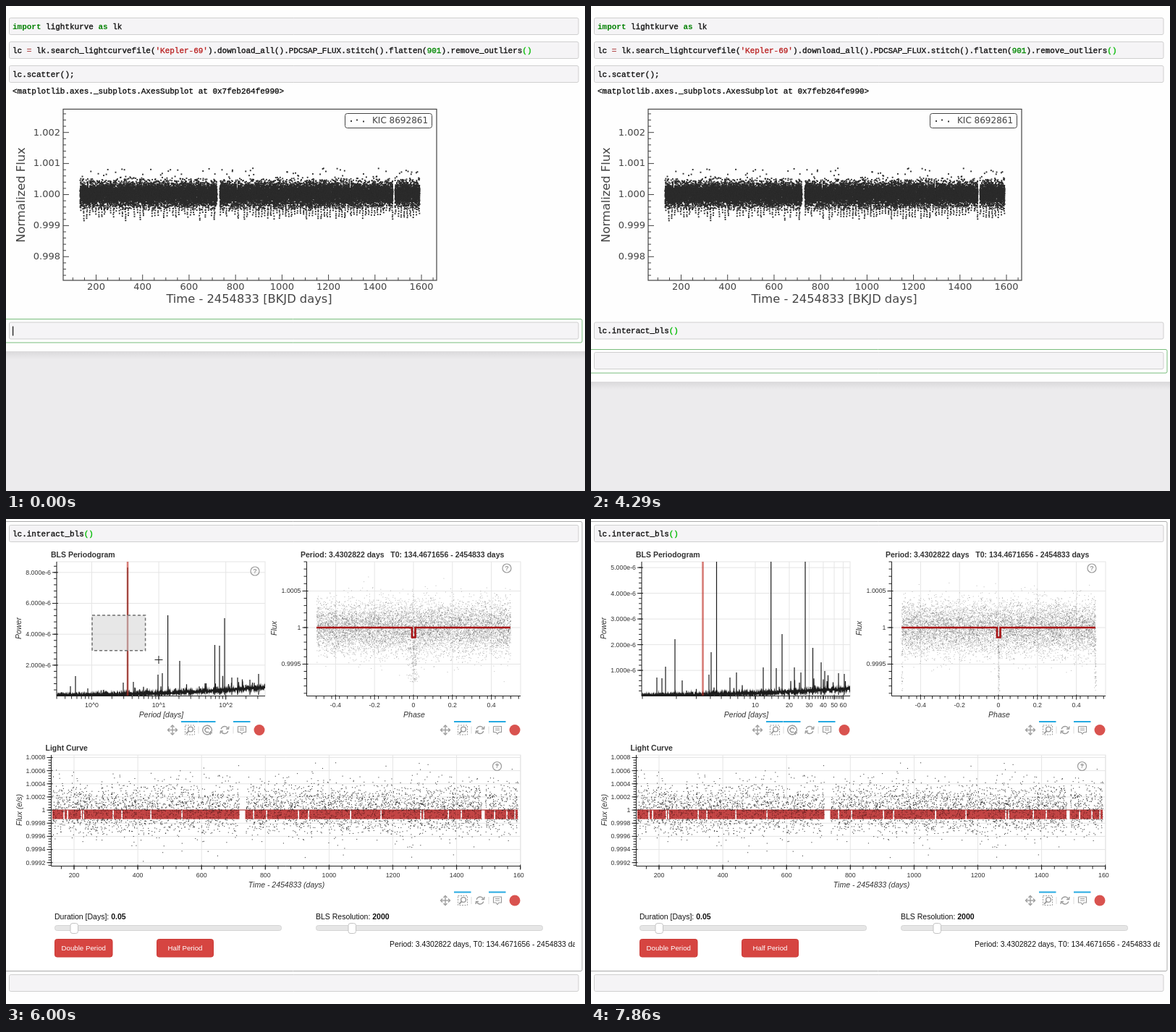
Recreate the animation shown at these times as an HTML page with a canvas. Size 800 px wide and 670 px high, loop 8 s.

```html
<!DOCTYPE html>
<html lang="en">
<head>
<meta charset="utf-8">
<title>Interactive BLS periodogram</title>
<style>
html, body { margin: 0; width: 100%; height: 100%; overflow: hidden; background: #fefefe; }
canvas { display: block; }
</style>
</head>
<body>
<canvas id="stage" width="800" height="670"></canvas>
<script>
const W = 800, H = 670, LOOP = 8000, STEP = 1000 / 7;
const MONO = '"Liberation Mono", monospace';
const SANS = '"Liberation Sans", sans-serif';
const DEJA = '"DejaVu Sans", sans-serif';
const CODE = 'lc.interact_bls()';
const PLAIN = '#111', KEYWORD = '#008000', BRACKET = '#0b0';
const view = document.getElementById('stage').getContext('2d');
let g = view;

// ---------- helpers ----------
function random(seed) {
  return () => {
    seed = (seed + 0x6D2B79F5) | 0;
    let r = Math.imul(seed ^ (seed >>> 15), seed | 1);
    r ^= r + Math.imul(r ^ (r >>> 7), r | 61);
    return ((r ^ (r >>> 14)) >>> 0) / 4294967296;
  };
}
const gauss = rnd => Math.sqrt(-2 * Math.log(1 - rnd())) * Math.cos(6.2832 * rnd());

function layer(paint) {
  const canvas = document.createElement('canvas');
  canvas.width = W;
  canvas.height = H;
  g = canvas.getContext('2d');
  paint();
  g = view;
  return canvas;
}
function rect(x, y, w, h, color) {
  g.fillStyle = color;
  g.fillRect(x, y, w, h);
}
function line(color, width, ...xy) {
  g.strokeStyle = color;
  g.lineWidth = width;
  g.beginPath();
  for (let i = 0; i < xy.length; i += 2) g.lineTo(xy[i], xy[i + 1]);
  g.stroke();
}
function box(x, y, w, h, fill, stroke, radius = 2) {
  g.beginPath();
  g.roundRect(x, y, w, h, radius);
  if (fill) { g.fillStyle = fill; g.fill(); }
  if (stroke) { g.strokeStyle = stroke; g.lineWidth = 1; g.stroke(); }
}
function text(s, x, y, font, color = '#333', align = 'left', turn = 0, outline = 0) {
  g.save();
  g.translate(x, y);
  g.rotate(turn);
  g.font = font;
  g.fillStyle = g.strokeStyle = color;
  g.textAlign = align;
  g.textBaseline = 'middle';
  g.fillText(s, 0, 0);
  if (outline) {
    g.lineWidth = outline;
    g.strokeText(s, 0, 0);
  }
  const width = g.measureText(s).width;
  g.restore();
  return width;
}
// parts: alternating text and colour; plain code is drawn in a medium weight
function code(y, ...parts) {
  let x = 9;
  for (let i = 0; i < parts.length; i += 2) {
    const bold = parts[i + 1] === KEYWORD;
    x += text(parts[i], x, y, `${bold ? 'bold ' : ''}10.97px ${MONO}`, parts[i + 1], 'left', 0, bold ? 0 : .35);
  }
}
const cell = y => box(4.5, y + .5, 786.5, 23, '#f5f4f6', '#cfcfcf');

// ---------- notebook ----------
function scatterPlot() {
  const INK = '#444', rnd = random(7);
  const dot = (x, y, s = 1.9) => g.fillRect(x - s / 2, y - s / 2, s, s);
  const inGap = x => (x > 291.5 && x < 295.5) || (x > 534.5 && x < 537.5);
  g.fillStyle = '#2b2b2b';
  for (let i = 0; i < 22000; i++) {
    const x = 102.5 + 469 * rnd(), d = gauss(rnd) * 7.9;
    if (!inGap(x) && Math.abs(d) < 22) dot(x, 260 + d);
  }
  for (let x = 103; x < 572; x += 4.1)
    for (let y = 276; y < 280 + 17 * Math.sqrt(rnd()); y += 2 + 2 * rnd())
      if (!inGap(x)) dot(x + rnd(), y);
  for (let i = 0; i < 130; i++) {
    const x = 103 + 468 * rnd();
    if (!inGap(x)) dot(x, 242 - 18 * rnd() ** 1.6);
  }
  for (const x of [114, 319, 475]) rect(x, 241, .8, 10, '#fefefe');

  g.strokeStyle = INK;
  g.lineWidth = 1.2;
  g.strokeRect(79, 142.5, 516, 236.5);
  for (let v = 100; v <= 1650; v += 50) {
    const x = 124.5 + (v - 200) * .3211, major = v % 200 === 0;
    line(INK, 1, x, 379, x, major ? 371 : 375);
    if (major) text(v, x, 388.5, `13px ${DEJA}`, INK, 'center');
  }
  for (let i = -13; i <= 13; i++) {
    const y = 260.5 - i * 8.58, major = i % 5 === 0;
    line(INK, 1, 79, y, major ? 87 : 83, y);
    if (major) text((1 + i / 5000).toFixed(3), 75, y + .5, `13px ${DEJA}`, INK, 'right');
  }
  text('Time - 2454833 [BKJD days]', 336, 405.5, `16.3px ${DEJA}`, INK, 'center');
  text('Normalized Flux', 22, 261, `16.3px ${DEJA}`, INK, 'center', -Math.PI / 2);
  box(468.5, 148.5, 120, 20, '#fefefe', INK, 3);
  g.fillStyle = '#2b2b2b';
  dot(477, 159); dot(485, 157.5); dot(494, 159.5);
  text('KIC 8692861', 506, 158.5, `12px ${DEJA}`, INK);
}

const notebook = layer(() => {
  rect(0, 0, W, H, '#fefefe');
  [16, 49, 82].forEach(cell);
  code(29, 'import', KEYWORD, ' lightkurve ', PLAIN, 'as', KEYWORD, ' lk', PLAIN);
  code(62, 'lc ', PLAIN, '=', '#a33', ' lk.search_lightcurvefile(', PLAIN, "'Kepler-69'", '#ba2121',
    ').download_all().PDCSAP_FLUX.stitch().flatten(', PLAIN, '901', '#080',
    ').remove_outliers', PLAIN, '()', BRACKET);
  code(95, 'lc.scatter();', PLAIN);
  code(118, '<matplotlib.axes._subplots.AxesSubplot at 0x7feb264fe990>', PLAIN);
  scatterPlot();
});

function drawNotebook(f) {
  const ran = f >= 23;
  const count = f < 2 ? 0 : f < 4 ? 1 : f < 14 ? f - 2 : f - 3;
  g.drawImage(notebook, 0, 0);
  const top = ran ? 474.5 : 432.5, floor = ran ? 519 : 477;
  box(-4, top, 800, 32.5, '#fff', '#78bd7c');
  cell(436.5);
  if (ran) cell(478);
  rect(0, floor, W, H - floor, '#ecebed');
  const shade = g.createLinearGradient(0, floor, 0, floor + 11);
  shade.addColorStop(0, '#dad9db');
  shade.addColorStop(1, '#ecebed');
  rect(0, floor, W, 11, shade);
  code(449.5, CODE.slice(0, Math.min(count, 15)), PLAIN, count > 15 ? '()' : '', BRACKET);
  if (!ran) rect(9 + 6.58 * (f >= 20 ? 17 : Math.min(count, 16)), 442.5, 1.2, 13, PLAIN);
}

// ---------- dashboard ----------
const TICK = `8.8px ${SANS}`, LABEL = `italic 10.5px ${SANS}`, TITLE = `bold 10.5px ${SANS}`;
const GRID = '#e5e5e5', AXIS = '#222';

// xs, ys: [position, label] pairs; minor ticks are plain positions
function axes(x0, y0, x1, y1, xs, ys, xMinor, yMinor) {
  g.strokeStyle = GRID;
  g.lineWidth = 1;
  g.strokeRect(x0, y0, x1 - x0, y1 - y0);
  for (const [x] of xs) line(GRID, 1, x, y0, x, y1);
  for (const [y] of ys) line(GRID, 1, x0, y, x1, y);
  return () => {
    line(AXIS, 1, x0, y0, x0, y1, x1, y1);
    for (const x of xMinor) if (x >= x0 && x <= x1) line(AXIS, 1, x, y1, x, y1 + 4);
    for (const y of yMinor) if (y >= y0 && y <= y1) line(AXIS, 1, x0 - 4, y, x0, y);
    for (const [x, s] of xs) {
      line(AXIS, 1, x, y1 - 2, x, y1 + 5);
      text(s, x, y1 + 13, TICK, '#333', 'center');
    }
    for (const [y, s] of ys) {
      line(AXIS, 1, x0 - 6, y, x0 + 2, y);
      text(s, x0 - 8, y + .5, TICK, '#333', 'right');
    }
  };
}
const range = (n, fn) => Array.from({ length: n }, (_, i) => fn(i));

function help(x, y) {
  g.beginPath();
  g.arc(x, y, 6, 0, 7);
  g.strokeStyle = '#999';
  g.lineWidth = 1.2;
  g.stroke();
  text('?', x, y + .5, `bold 9px ${SANS}`, '#999', 'center');
}

const ICON = '#9a9a9a';
const icons = {
  pan(x, y) {
    line(ICON, 1.3, x - 6, y, x + 6, y);
    line(ICON, 1.3, x, y - 6, x, y + 6);
    for (let i = 0; i < 4; i++) {
      g.save();
      g.translate(x, y);
      g.rotate(i * Math.PI / 2);
      line(ICON, 1.3, 4, -2.5, 6.5, 0, 4, 2.5);
      g.restore();
    }
  },
  zoom(x, y) {
    g.setLineDash([2, 1.5]);
    line(ICON, 1, x - 6.5, y - 6.5, x + 6.5, y - 6.5, x + 6.5, y + 6.5, x - 6.5, y + 6.5, x - 6.5, y - 6.5);
    g.setLineDash([]);
    icons.ring(x + 1, y - 1, 3.4, 0, 7);
    line(ICON, 1.8, x - 1, y + 1, x - 5, y + 5);
  },
  ring(x, y, r, a, b) {
    g.strokeStyle = ICON;
    g.lineWidth = 1.4;
    g.beginPath();
    g.arc(x, y, r, a, b);
    g.stroke();
  },
  wheel(x, y) {
    icons.ring(x, y, 6.3, .9, 6.8);
    icons.ring(x, y, 3, .9, 6);
    line(ICON, 1.3, x + 2, y + 4, x + 7, y + 4);
    line(ICON, 1.3, x + 4.5, y + 1.5, x + 4.5, y + 6.5);
  },
  reset(x, y) {
    icons.ring(x, y, 5, .3, 2.7);
    icons.ring(x, y, 5, 3.4, 5.8);
    line(ICON, 1.4, x + 6, y - 5, x + 5.5, y - 1.5, x + 2, y - 1.5);
    line(ICON, 1.4, x - 6, y + 5, x - 5.5, y + 1.5, x - 2, y + 1.5);
  },
  hover(x, y) {
    line(ICON, 1.2, x - 5.5, y - 5, x + 5.5, y - 5, x + 5.5, y + 3, x + 2, y + 3,
      x, y + 5.5, x - 2, y + 3, x - 5.5, y + 3, x - 5.5, y - 5);
    line(ICON, 1, x - 3, y - 2.5, x + 3, y - 2.5);
    line(ICON, 1, x - 3, y, x + 3, y);
  }
};
function toolbar(x, y, names) {
  names.forEach((name, i) => {
    const cx = x + 24 * i;
    icons[name](cx, y);
    if (['zoom', 'wheel', 'hover'].includes(name)) rect(cx - 12, y - 12.5, 23.5, 2, '#26aae1');
    if (name === 'zoom' || name === 'reset') line('#ddd', 1, cx + 12, y - 5, cx + 12, y + 5);
  });
  g.fillStyle = '#d9534f';
  g.beginPath();
  g.arc(x + 24 * names.length, y, 7.5, 0, 7);
  g.fill();
}

const PEAKS = [[89, 231], [96, 217], [113, 234], [162, 226], [168, 67], [176, 225], [210, 215],
  [216, 213], [223.6, 133], [240, 196], [288.5, 174], [295, 175], [302, 137], [312, 219],
  [320, 219], [337, 222], [349, 214]];
const FINE_PEAKS = [[91, 219], [98, 220], [103, 204], [116, 166], [126, 223], [163, 215], [166, 184],
  [173.5, 30], [192, 219], [201, 212], [238, 205], [248.7, 30], [256, 206], [264, 159], [281, 205],
  [290, 212], [296, 30], [306.5, 178], [318, 198], [323, 210], [342, 213], [350, 214]];

function spectrum(peaks, seed, rise, mapX, mapY) {
  const rnd = random(seed);
  g.save();
  g.beginPath();
  g.rect(70, 59, 288, 185.5);
  g.clip();
  g.beginPath();
  for (let x = 70; x <= 358; x += .5) {
    const u = (x - 70) / 288, base = 243.5 - rise * u ** 2;
    const spike = (1.2 + 2.5 * u) * rnd() + 20 * (.2 + u) * rnd() ** 22;
    g.lineTo(mapX(x), mapY(base - spike));
    g.lineTo(mapX(x + .25), mapY(base + .3));
  }
  for (const [x, y] of peaks) {
    g.moveTo(mapX(x), mapY(243));
    g.lineTo(mapX(x), mapY(y));
  }
  g.strokeStyle = '#1c1c1c';
  g.lineWidth = 1.2;
  g.stroke();
  g.restore();
}

// state: 0 = full range, 1 = zoomed, 2 = zoomed and recomputed
function periodogram(state) {
  const zoom = state > 0;
  const logX = p => zoom ? 227 + 156 * Math.log10(p / 10) : 118.5 + 92.6 * Math.log10(p);
  const xs = zoom ? range(6, i => [logX(10 * (i + 1)), 10 * (i + 1)])
    : range(3, i => [logX(10 ** i), '10^' + i]);
  const unit = zoom ? 35.5 : 21.35;
  const ys = range(zoom ? 5 : 4, i => {
    const v = zoom ? i + 1 : 2 * i + 2;
    return [244.6 - v * unit, v + '.000e-6'];
  });
  const xMinor = range(36, i => logX((i % 9 + 1) * 10 ** (Math.floor(i / 9) - 1)));
  if (zoom) xMinor.push(...range(26, i => logX(10 + 2 * i)));
  const finish = axes(70, 59, 358, 244.5, xs, ys, xMinor, range(26, i => 244.6 - i * unit * (zoom ? .2 : .4)));
  if (state === 2) spectrum(FINE_PEAKS, 21, 8, x => x, y => y);
  else spectrum(PEAKS, 5, 10, zoom ? x => 71 + (x - 118.5) * 1.685 : x => x,
    zoom ? y => 244.6 + (y - 244.6) * 1.664 : y => y);
  line('rgba(190,45,35,.62)', 2.6, logX(3.4303), 59, logX(3.4303), 244);
  finish();
  text('BLS Periodogram', 62, 50, TITLE);
  text('Period [days]', 214.5, 271, LABEL, '#333', 'center');
  text('Power', 18, 151, LABEL, '#333', 'center', -Math.PI / 2);
  if (!zoom) help(344, 72);
  toolbar(230, 291.5, ['pan', 'zoom', 'wheel', 'reset', 'hover']);
}

function phasePlot(state) {
  const rnd = random(11 + state), folded = state === 2;
  const finish = axes(415.5, 59, 711, 244.5,
    [-.4, -.2, 0, .2, .4].map(v => [563 + v * 269, v]),
    [[99.5, '1.0005'], [150, '1'], [200.5, '0.9995']],
    range(27, i => 428.5 + i * 10.76), range(20, i => 59 + i * 10.1));
  g.fillStyle = 'rgba(60,60,60,.42)';
  for (let i = 0; i < 8500; i++) {
    const y = 150 + gauss(rnd) * 18;
    if (y > 62 && y < 230) g.fillRect(429 + 268 * rnd(), y, .9, .9);
  }
  for (let i = 0; i < 150; i++) {
    const centre = folded ? 429.5 + 133.5 * Math.floor(rnd() * 3) : 563.5;
    g.fillRect(centre + gauss(rnd) * (folded ? .6 : 4), 165 + (folded ? 72 : 60) * rnd(), .9, .9);
  }
  line('#a81416', 2.6, 429, 150, 561, 150, 561, 163.5, 565.5, 163.5, 565.5, 150, 697, 150);
  finish();
  text('Period: 3.4302822 days   T0: 134.4671656 - 2454833 days', 407, 50, TITLE);
  text('Phase', 564, 271, LABEL, '#333', 'center');
  text('Flux', 371.5, 151, LABEL, '#333', 'center', -Math.PI / 2);
  help(692, 68);
  toolbar(607, 291.5, ['pan', 'zoom', 'reset', 'hover']);
}

function lightCurve() {
  const rnd = random(3);
  const finish = axes(62.5, 326, 711, 479.5,
    range(8, i => [94 + 88.1 * i, i < 7 ? 200 * (i + 1) : '']),
    range(9, i => [329.5 + 18.15 * i, String(+(1.0008 - i * .0002).toFixed(4))]),
    range(38, i => 76.4 + i * 17.62), range(43, i => 329.5 + i * 3.63));
  text('160', 701, 492.5, TICK);
  rect(64, 402, 643, 12.5, '#c94a4a');
  for (let x = 64; x < 707; x += 1.515) rect(x, 402, .5, 12.5, '#b63b3b');
  for (const x of [80, 85, 104, 107, 148, 160, 200, 243, 342, 360, 404, 418, 476, 518, 573, 577,
    611, 629, 675, 692, 703]) rect(x - .7, 402, 1.7, 13, '#fefefe');
  rect(322.5, 402, 8, 13, '#fefefe');
  rect(657, 402, 4.5, 13, '#fefefe');
  line('#a02828', 1.2, 64, 402, 707, 402);
  for (let i = 0; i < 4700; i++) {
    const x = 64 + 643 * rnd(), wide = rnd() < .06;
    const y = 400 + gauss(rnd) * (wide ? 31 : 17);
    if ((x > 322 && x < 331) || (x > 657 && x < 662) || y < 335 || y > 477) continue;
    rect(x, y, 1.05, 1.05, y > 402 && y < 414 ? 'rgba(70,20,20,.6)' : 'rgba(30,30,30,.9)');
  }
  finish();
  text('Light Curve', 54.5, 317, TITLE);
  text('Time - 2454833 (days)', 387.5, 506.5, LABEL, '#333', 'center');
  text('Flux (e/s)', 19, 402, LABEL, '#333', 'center', -Math.PI / 2);
  help(678.5, 341.5);
  toolbar(607, 527, ['pan', 'zoom', 'reset', 'hover']);
}

function slider(x, handle, label, value) {
  const w = text(label, x, 550, `10.5px ${SANS}`, '#111');
  text(value, x + w, 550, TITLE, '#111');
  box(x + .5, 561.5, 313, 7, '#e6e6e6', '#d4d4d4', 3);
  box(handle, 558.5, 10.5, 14, '#fff', '#c4c4c4', 3);
}
function button(x, w, label) {
  box(x, 580.5, w, 24.5, '#d64541', '#cc3b37', 3);
  text(label, x + w / 2, 593, `9.7px ${SANS}`, '#fff', 'center');
}

const dashboards = range(3, state => layer(() => {
  rect(0, 0, W, H, '#fefefe');
  box(-4, 3.5, 800, 621, '#fff', '#ababab');
  cell(8);
  cell(629);
  code(21, CODE.slice(0, -2), PLAIN, '()', BRACKET);
  periodogram(state);
  phasePlot(state);
  lightCurve();
  slider(67, 89, 'Duration [Days]: ', '0.05');
  slider(428, 473, 'BLS Resolution: ', '2000');
  button(67.5, 79.5, 'Double Period');
  button(208.5, 78, 'Half Period');
  g.save();
  g.beginPath();
  g.rect(520, 575, 266, 30);
  g.clip();
  text('Period: 3.4302822 days, T0: 134.4671656 - 2454833 days', 530, 588.5, `10.4px ${SANS}`, '#111');
  g.restore();
}));

// ---------- drag selection ----------
function pointer(f) {
  const a = Math.max(0, Math.min(f - 37, 5)), b = Math.max(0, Math.min(f - 42, 5));
  return [119 + 18.4 * a + 15.4 * b, 133 + 12.2 * a + 13.6 * b];
}
function drawDrag(f) {
  const [bx, by] = pointer(f - 1);
  const w = Math.min(bx, 285) - 119, h = Math.min(by, 244) - 133;
  if (w > 0) {
    rect(119, 133, w, h, 'rgba(211,211,211,.55)');
    g.strokeStyle = '#707070';
    g.lineWidth = 1.5;
    g.setLineDash([4, 3]);
    g.strokeRect(119, 133, w, h);
    g.setLineDash([]);
  }
  const [x, y] = pointer(f);
  if (y < 244) {
    line('#222', 1, x - 5.5, y + .5, x + 5.5, y + .5);
    line('#222', 1, x, y - 5, x, y + 6);
  } else {
    g.beginPath();
    for (const [dx, dy] of [[0, 0], [0, 11], [2.5, 8.7], [4.2, 12], [6, 11.2], [4.5, 8], [7.7, 7.8]])
      g.lineTo(x + dx, y + dy - .5);
    g.closePath();
    g.fillStyle = '#000';
    g.fill();
    g.strokeStyle = '#fff';
    g.lineWidth = .7;
    g.stroke();
  }
}

function frame() {
  const f = Math.floor((performance.now() % LOOP + 5) / STEP) % 56;
  if (f < 31) drawNotebook(f);
  else {
    g.drawImage(dashboards[f < 51 ? 0 : f < 55 ? 1 : 2], 0, 0);
    if (f >= 37 && f < 51) drawDrag(f);
  }
  requestAnimationFrame(frame);
}
frame();
</script>
</body>
</html>
```
